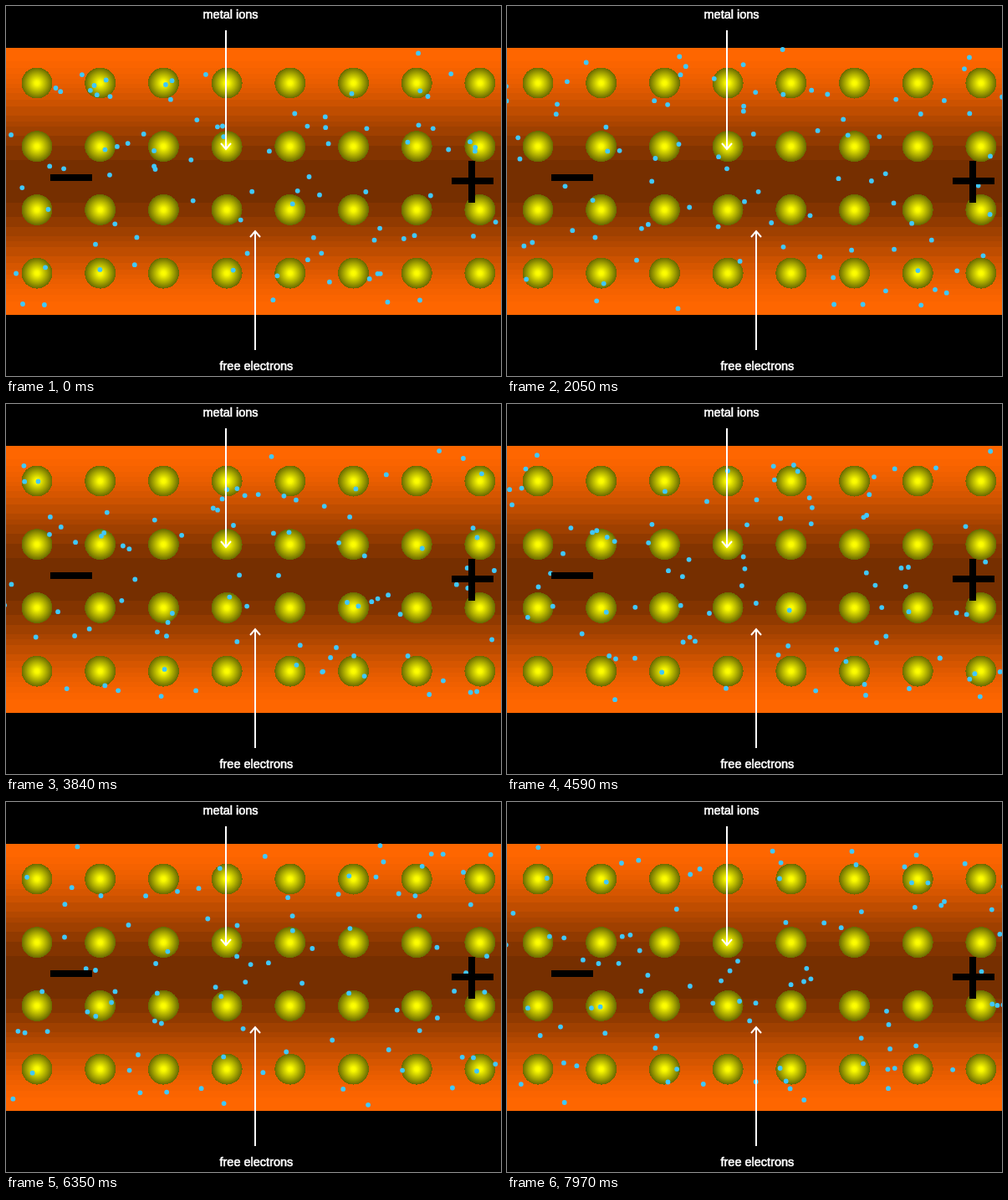
An HTML page that plays this animation: 592x442 px, repeating every 8 s.

```html
<!DOCTYPE html>
<html lang="en">
<head>
<meta charset="utf-8">
<title>Free electrons in a metal</title>
<style>
html, body { margin: 0; width: 100%; height: 100%; overflow: hidden; background: #000; }
svg { display: block; width: 592px; height: 442px; }
text { font: 14.5px "Liberation Sans", Arial, sans-serif; fill: #fff; stroke: #fff; stroke-width: .6; }
.arrow { fill: none; stroke: #fff; stroke-width: 2; }
</style>
</head>
<body>
<svg viewBox="0 0 592 442">
  <defs>
    <radialGradient id="ion">
      <stop offset="0" stop-color="#ff0"/>
      <stop offset=".15" stop-color="#f8f800"/>
      <stop offset="1" stop-color="#686800"/>
    </radialGradient>
  </defs>
  <rect width="592" height="442"/>
  <g id="metal" shape-rendering="crispEdges"></g>
  <g id="ions" fill="url(#ion)" shape-rendering="crispEdges"></g>
  <g id="electrons" fill="#40c8fc"></g>
  <path d="M53 201h50v8h-50zM553 185h8v20h22v8h-22v22h-8v-22h-20v-8h20z"/>
  <path class="arrow" d="M263 29V171M257 164l6 7 6-7M298 411V269M292 276l6-7 6 7"/>
  <text x="235.5" y="15">metal ions</text>
  <text x="255.5" y="435">free electrons</text>
</svg>
<script>
const LOOP = 8000, STEP = 147.6, STEPS = 55, COUNT = 86;
const WIDTH = 592, TOP = 52, BOTTOM = 362;
const $ = id => document.getElementById(id);

function add(parent, tag, attrs) {
  const el = document.createElementNS('http://www.w3.org/2000/svg', tag);
  for (const key in attrs) el.setAttribute(key, attrs[key]);
  return parent.appendChild(el);
}

function seeded(seed) {
  return () => {
    seed = (seed * 1664525 + 1013904223) >>> 0;
    return seed / 4294967296;
  };
}

// Orange bands, eased towards the dark middle; each one covers the centre of the last
const edges = [50, 66, 74, 81, 87, 93, 98, 104, 112, 120, 131, 138, 144, 155, 167, 184, 235];
edges.slice(0, -1).forEach((y, i) => {
  const mid = Math.min((y + edges[i + 1]) / 2, 197);
  const red = 255 - 69.5 * (1 - Math.cos(Math.PI * (mid - 50) / 159.5));
  const fill = `rgb(${Math.round(red)},${Math.round(red * .4)},0)`;
  add($('metal'), 'rect', { x: 0, y, width: WIDTH, height: 419 - 2 * y, fill });
});

for (let row = 0; row < 4; row++) {
  for (let col = 0; col < 8; col++) {
    add($('ions'), 'circle', { cx: 37 + col * 75.7, cy: 92 + row * 75.7, r: 18.5 });
  }
}

// Random thermal walk with a slow drift towards the plus sign
function walk(rand) {
  let x = rand() * WIDTH, y = TOP + rand() * (BOTTOM - TOP), heading = rand() * 2 * Math.PI;
  const path = [];
  for (let i = 0; i < STEPS; i++) {
    path.push([x, y]);
    heading += (rand() - .5) * 3;
    x += 4 + 9 * Math.cos(heading);
    y += 9 * Math.sin(heading);
    if (x > WIDTH + 2) x -= WIDTH + 4;
    if (x < -2) x += WIDTH + 4;
    if (y < TOP || y > BOTTOM) {
      y = 2 * (y < TOP ? TOP : BOTTOM) - y;
      heading = -heading;
    }
  }
  return path;
}

const rand = seeded(2024);
const electrons = Array.from({ length: COUNT }, () => ({
  path: walk(rand),
  dot: add($('electrons'), 'circle', { r: 2.9 })
}));

function draw(time) {
  const step = Math.min(STEPS - 1, Math.floor((time % LOOP + 8) / STEP));
  for (const { path, dot } of electrons) {
    const [x, y] = path[step];
    dot.setAttribute('cx', x.toFixed(1));
    dot.setAttribute('cy', y.toFixed(1));
  }
}

const start = performance.now();
function tick() {
  draw(performance.now() - start);
  requestAnimationFrame(tick);
}
tick();
</script>
</body>
</html>
```
